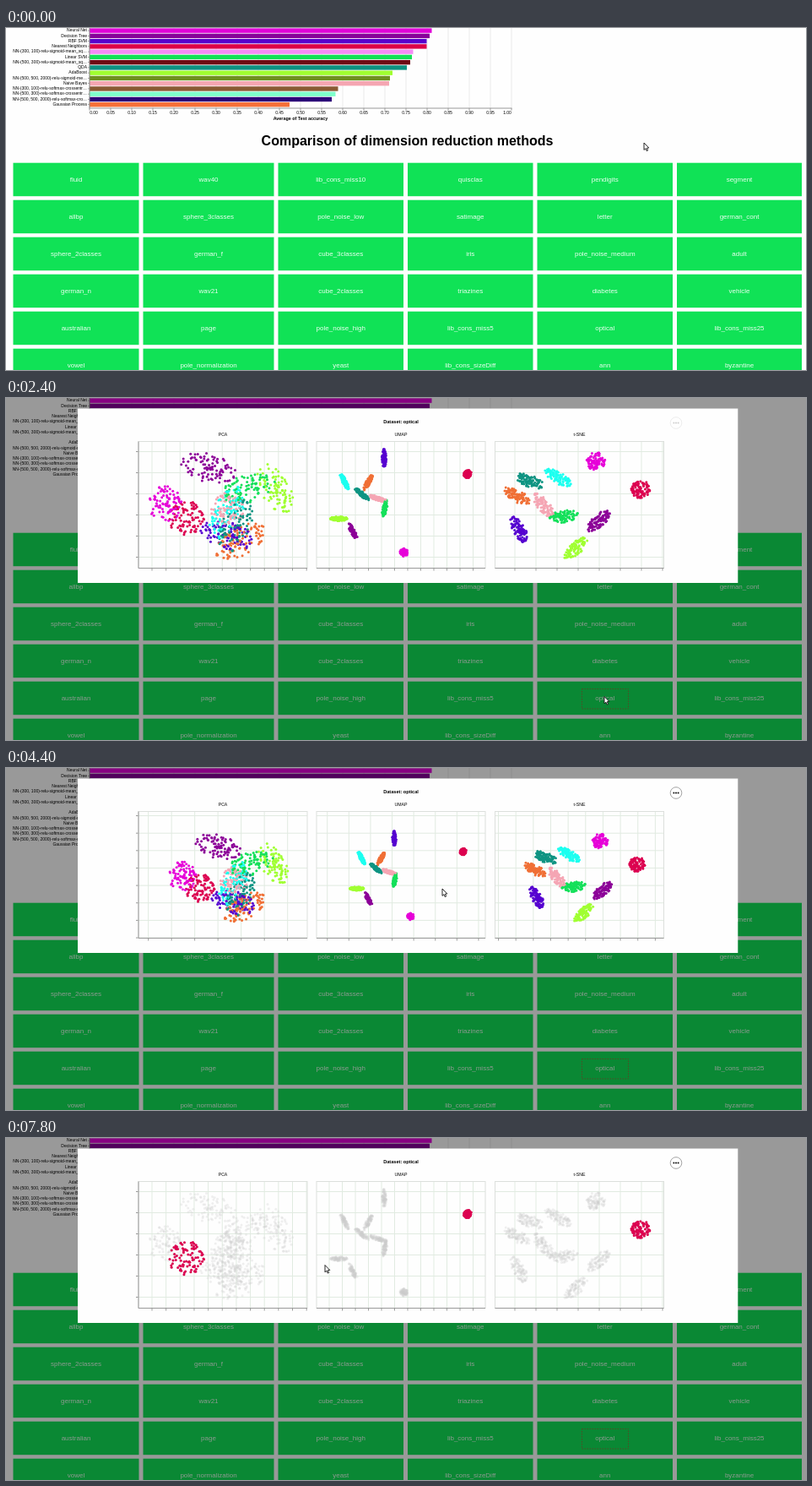
An HTML page with a canvas that plays this animation: 948x405 px, repeating every 8 s.

```html
<!DOCTYPE html>
<html lang="en">
<head>
<meta charset="utf-8">
<title>Dimension reduction</title>
<style>
html, body { margin: 0; width: 948px; height: 405px; overflow: hidden; background: #fefefe; }
canvas { display: block; }
</style>
</head>
<body>
<canvas id="stage" width="948" height="405"></canvas>
<script>
const ctx = document.getElementById('stage').getContext('2d');
const LOOP = 8000, STEP = 200, GAP = 5;
const FONT = '"Liberation Sans", Arial, sans-serif';

const bars = [
  ['Neural Net', .811, '#e000d8'],
  ['Decision Tree', .806, '#88009a'],
  ['RBF SVM', .799, '#5800cc'],
  ['Nearest Neighbors', .799, '#dc0048'],
  ['NN-(300, 100)-relu-sigmoid-mean_sq…', .767, '#f58af5'],
  ['Linear SVM', .764, '#12e056'],
  ['NN-(500, 300)-relu-sigmoid-mean_sq…', .76, '#6e0a14'],
  ['QDA', .752, '#0d9080'],
  ['AdaBoost', .718, '#a0ff30'],
  ['NN-(500, 500, 2000)-relu-sigmoid-me…', .712, '#6f9020'],
  ['Naive Bayes', .71, '#f5a6b2'],
  ['NN-(300, 100)-relu-softmax-crossentr…', .589, '#8a5a34'],
  ['NN-(500, 300)-relu-softmax-crossentr…', .583, '#80ffcc'],
  ['NN-(500, 500, 2000)-relu-softmax-cro…', .574, '#2c0078'],
  ['Gaussian Process', .474, '#f67038']
];

const columnWidths = [149, 155, 148.5, 148.5, 160.5, 148];
const cards = [
  'fluid wav40 lib_cons_miss10 quisclas pendigits segment',
  'allbp sphere_3classes pole_noise_low satimage letter german_cont',
  'sphere_2classes german_f cube_3classes iris pole_noise_medium adult',
  'german_n wav21 cube_2classes triazines diabetes vehicle',
  'australian page pole_noise_high lib_cons_miss5 optical lib_cons_miss25',
  'vowel pole_normalization yeast lib_cons_sizeDiff ann byzantine'
].map(row => row.split(' '));

const panels = [
  { name: 'PCA', x: 157, first: 16, pitch: 16.65, spread: 21, stretch: 1.6, squeeze: .8 },
  { name: 'UMAP', x: 368, first: 15, pitch: 15.5, spread: 4.8, stretch: 2.2, squeeze: .55 },
  { name: 't-SNE', x: 579.5, first: 23.5, pitch: 25, spread: 11, stretch: 1.6, squeeze: .65 }
];

// Per class: colour, then its centre in each panel, with a tilt in degrees if elongated
const classes = [
  ['#dc0050', [214, 143], [547, 90], [752, 108]],
  ['#8c0098', [240, 83, 15], [411, 158, 63], [702, 146, -43]],
  ['#e600d8', [189, 125], [471.5, 183], [699, 75]],
  ['#1cfff0', [262, 136, -65], [401, 99, 63], [654, 94, 32]],
  ['#f5a6b4', [264, 132], [441, 119, 18], [637, 127, 50]],
  ['#14e05a', [286, 108, -15], [449, 130, -78], [661, 140, -10]],
  ['#a0ff32', [319, 108, 60], [394, 143, 0], [675, 178, -42]],
  ['#f07036', [277, 170, -28], [429, 100, -60], [606, 116, 30]],
  ['#5600d0', [261, 163, 12], [448, 71, 90], [608, 156, 60]],
  ['#0f9482', [272, 152, -65], [422, 114, 40], [620, 98, 20]]
];

let seed = 7;
const rand = () => (seed = (seed * 16807) % 2147483647) / 2147483647;

function scatter([cx, cy, tilt], { spread, stretch, squeeze }) {
  const a = rand() * 2 * Math.PI, r = spread * rand() ** .6;
  const long = tilt === undefined ? 1 : stretch, thin = tilt === undefined ? 1 : squeeze;
  const u = Math.cos(a) * r * long, v = Math.sin(a) * r * thin;
  const turn = (tilt || 0) * Math.PI / 180, c = Math.cos(turn), s = Math.sin(turn);
  return { x: cx + u * c - v * s, y: cy + u * s + v * c };
}

panels.forEach((p, n) => {
  p.dots = [];
  for (let i = 0; i < 90; i++) {
    classes.forEach((k, kind) => p.dots.push({ ...scatter(k[n + 1], p), kind }));
  }
});

// Time followed by the values reached
const cursorKeys = [[200, 756, 136], [1400, 702, 349], [1600, 709, 353.5], [2400, 709, 353.5],
  [3400, 517, 143], [5000, 517, 143], [6000, 749, 111], [6600, 749, 111],
  [7400, 281, 138], [7800, 378, 150.5]];
const zoomKeys = [[3400, 1], [4000, .765], [4200, .765], [4800, 1]];
const buttonKeys = [[2600, .2], [3000, 1]];

function at(keys, t) {
  const n = keys.findIndex(k => k[0] >= t);
  if (n < 0) return keys[keys.length - 1].slice(1);
  if (n === 0) return keys[0].slice(1);
  const a = keys[n - 1], b = keys[n];
  const u = (t - a[0]) / (b[0] - a[0]), e = u * u * (3 - 2 * u);
  return a.slice(1).map((v, i) => v + (b[i + 1] - v) * e);
}

function text(str, x, y, size, color = '#000', align = 'center', weight = '') {
  ctx.font = `${weight} ${size}px ${FONT}`;
  ctx.textAlign = align;
  ctx.textBaseline = 'middle';
  ctx.fillStyle = color;
  ctx.fillText(str, x, y);
}

function rect(x, y, w, h, color) {
  ctx.fillStyle = color;
  ctx.fillRect(x, y, w, h);
}

function disc(x, y, r, color) {
  ctx.fillStyle = color;
  ctx.beginPath();
  ctx.arc(x, y, r, 0, 7);
  ctx.fill();
}

function drawBars() {
  for (let i = 0; i <= 20; i++) {
    const x = 99 + i * 25;
    rect(x - .5, 0, 1, 95, '#e9e9e9');
    rect(x - .5, 95, 1, 2.5, '#999');
    const shift = i === 0 ? 5 : i === 20 ? -5 : 0;
    text((i / 20).toFixed(2), x + shift, 100.7, 5);
  }
  bars.forEach(([name, value, color], i) => {
    const y = 3 + i * 6.26;
    rect(99, y - 2.6, value * 500, 5.4, color);
    rect(97, y - .3, 2, .7, '#888');
    text(name, 96, y, 5, '#000', 'right');
  });
  rect(98.5, 0, 1, 95, '#888');
  rect(98.5, 94.5, 501, 1, '#999');
  text('Average of Test accuracy', 349, 108, 5.4, '#000', 'center', 'bold');
}

function drawCards(focused) {
  text('Comparison of dimension reduction methods', 475.5, 135, 16, '#000', 'center', 'bold');
  cards.forEach((row, r) => {
    let x = 8.5;
    row.forEach((name, c) => {
      const w = columnWidths[c], y = 159.7 + r * 44;
      rect(x, y, w, 39.5, '#10e256');
      text(name, x + w / 2, y + 20.3, 8, '#eafff0');
      x += w + GAP;
    });
  });
  if (!focused) return;
  ctx.strokeStyle = '#8a7a3c';
  ctx.lineWidth = 1;
  ctx.setLineDash([1.5, 1.5]);
  ctx.strokeRect(682.5, 344.5, 55, 23.5);
  ctx.setLineDash([]);
}

function drawGrid(p, zoom, zx, zy) {
  // Ticks thin out to every second one when zoomed out
  const pitch = p.pitch * (zoom < .9 && p.pitch < 20 ? 2 : 1);
  for (let k = -4; k < 16; k++) {
    const x = zx(p.x + p.first + k * pitch), y = zy(63.5 + k * 25);
    if (x >= p.x && x <= p.x + 200) {
      rect(x - .5, 52, 1, 150, '#e1ebe1');
      rect(x - .5, 202, 1, 2.5, '#999');
    }
    if (y >= 52 && y <= 202) {
      rect(p.x, y - .5, 200, 1, '#e1ebe1');
      if (p === panels[0]) rect(154, y - .5, 3, 1, '#999');
    }
  }
  ctx.strokeStyle = '#dcdfdc';
  ctx.lineWidth = 1;
  ctx.strokeRect(p.x, 51.5, 200, 150);
  rect(p.x, 201, 200, 1, '#999');
  if (p === panels[0]) rect(156.5, 51.5, 1, 150, '#999');
}

function drawPanel(p, zoom, highlight) {
  const zx = x => p.x + 149 + (x - p.x - 149) * zoom;
  const zy = y => 142 + (y - 142) * zoom;
  const dot = (d, color) => disc(zx(d.x), zy(d.y), 1.5, color);
  text(p.name, p.x + 100, 43.3, 5.2);
  drawGrid(p, zoom, zx, zy);
  for (const d of p.dots) dot(d, highlight ? 'rgba(205,205,205,.3)' : classes[d.kind][0]);
  if (highlight) p.dots.filter(d => d.kind === 0).forEach(d => dot(d, classes[0][0]));
}

function drawButton(opacity) {
  ctx.globalAlpha = opacity;
  ctx.strokeStyle = '#999';
  ctx.lineWidth = .9;
  ctx.beginPath();
  ctx.arc(794, 29.5, 6.8, 0, 7);
  ctx.stroke();
  for (const dx of [-2.6, 0, 2.6]) disc(794 + dx, 29.5, 1, '#111');
  ctx.globalAlpha = 1;
}

function drawDialog(t) {
  rect(0, 0, 948, 405, 'rgba(0,0,0,.4)');
  rect(85, 12.5, 782.3, 206.5, '#fefefe');
  text('Dataset: optical', 468, 28, 5.6, '#000', 'center', 'bold');
  drawButton(at(buttonKeys, t)[0]);
  const [zoom] = at(zoomKeys, t);
  for (const p of panels) drawPanel(p, zoom, t >= 6400);
}

function drawTooltip() {
  ctx.save();
  ctx.shadowColor = 'rgba(0,0,0,.2)';
  ctx.shadowBlur = 3;
  ctx.shadowOffsetY = 1;
  ctx.fillStyle = '#fefefe';
  ctx.beginPath();
  ctx.roundRect(754.5, 118, 31, 15, 2);
  ctx.fill();
  ctx.restore();
  ctx.strokeStyle = '#ddd';
  ctx.lineWidth = .7;
  ctx.stroke();
  text('Class:', 774.5, 126, 5.6, '#888', 'right');
  text('0', 777, 126, 5.6, '#111', 'left');
}

function drawCursor(x, y) {
  const outline = [[0, 0], [0, 8.4], [1.9, 6.7], [3.2, 9.6], [4.6, 9], [3.3, 6.2], [5.8, 6]];
  ctx.beginPath();
  for (const [dx, dy] of outline) ctx.lineTo(x + dx, y + dy);
  ctx.closePath();
  ctx.fillStyle = '#fff';
  ctx.fill();
  ctx.strokeStyle = '#111';
  ctx.lineWidth = .9;
  ctx.stroke();
}

function draw(now) {
  const t = Math.floor(now % LOOP / STEP) * STEP;
  rect(0, 0, 948, 405, '#fefefe');
  drawBars();
  drawCards(t >= 2000);
  if (t >= 2400) drawDialog(t);
  if (t >= 6000 && t < 6800) drawTooltip();
  drawCursor(...at(cursorKeys, t));
}

const start = performance.now();
function loop() {
  draw(performance.now() - start);
  requestAnimationFrame(loop);
}
loop();
</script>
</body>
</html>
```
